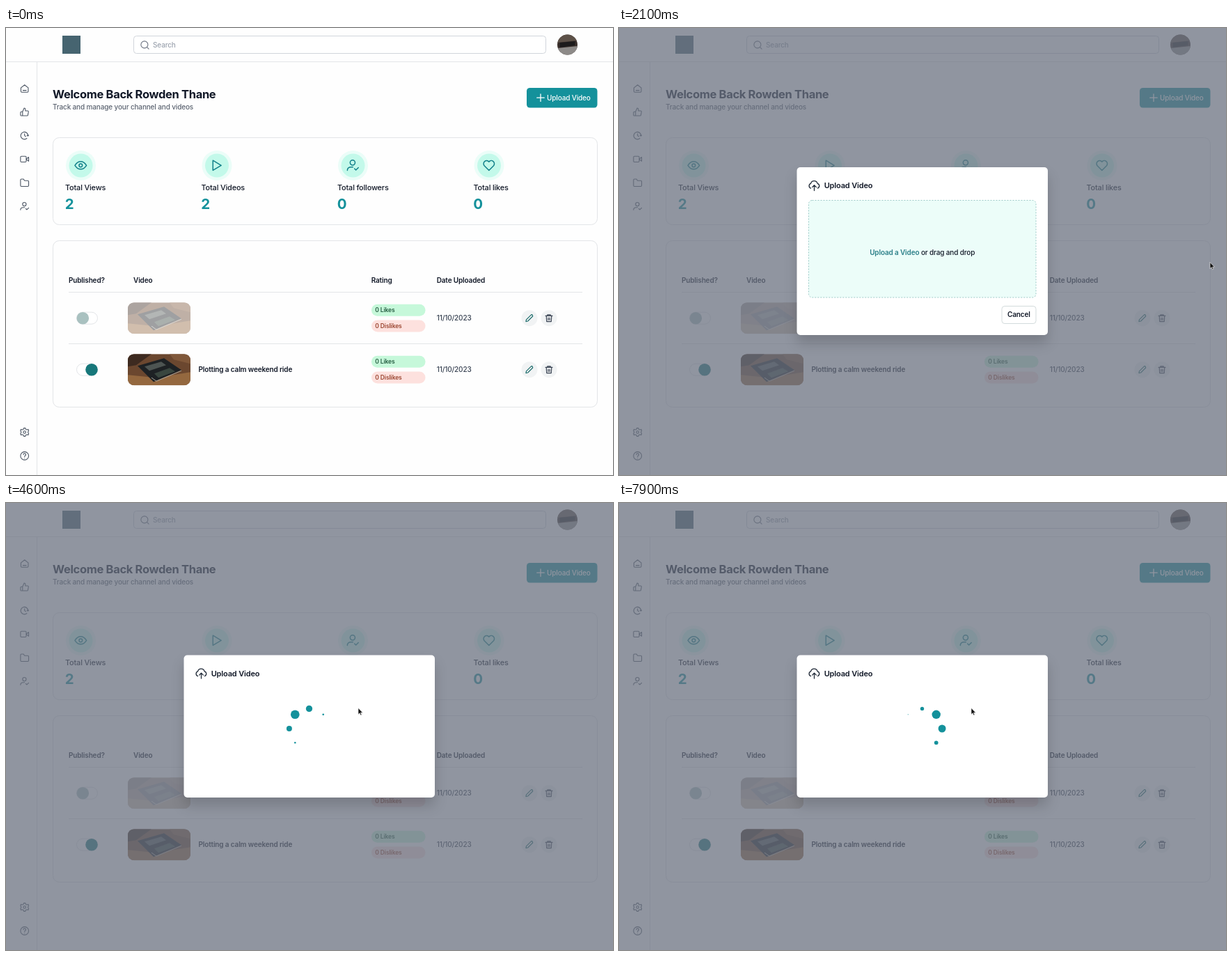
An HTML page that plays this animation: 872x642 px, repeating every 8 s.

```html
<!DOCTYPE html>
<html lang="en">
<head>
<meta charset="utf-8">
<title>Channel dashboard</title>
<style>
  html, body { margin: 0; width: 100%; height: 100%; overflow: hidden; background: #fefefe; }
  svg { display: block; width: 100vw; height: 100vh; }
  text { font: 500 10px Inter, "Liberation Sans", sans-serif; letter-spacing: -.015em; fill: #111827; white-space: pre; }
  .h1 { font-size: 16.5px; font-weight: 700; letter-spacing: -.02em; }
  .sub { fill: #5b6370; }
  .label { font-size: 10.9px; }
  .count { font-size: 20.5px; font-weight: 700; fill: #14919b; }
  .strong { font-weight: 600; }
  .title { font-size: 11px; font-weight: 600; }
  .badge { font-size: 8.5px; font-weight: 600; }
  .line { fill: none; stroke: #e3e5e8; }
  .icon { fill: none; stroke-linecap: round; stroke-linejoin: round; }
  #panelBox { filter: drop-shadow(0 12px 9px rgba(0, 0, 0, .16)); }
</style>
</head>
<body>
<svg viewBox="0 0 872 642" preserveAspectRatio="none">
  <defs>
    <clipPath id="thumbClip"><rect width="90" height="45" rx="9"/></clipPath>
    <clipPath id="avatarClip"><circle r="14.5"/></clipPath>
    <g id="thumb" clip-path="url(#thumbClip)">
      <rect width="90" height="45" fill="#6b472f"/>
      <path d="M0 0h34L12 16 0 18z" fill="#3d2a20"/>
      <path d="M0 30l40 4 50-8v19H0z" fill="#94683f"/>
      <path d="M60 0h30v14L66 8z" fill="#80583a"/>
      <path d="M14 17L52 6l25 17-40 17z" fill="#1d2124"/>
      <path d="M24 18l24-7 7 5-24 8z" fill="#4d5452"/>
      <path d="M38 28l22-8 8 5-24 9z" fill="#39463f"/>
      <path d="M34 34l7 5 36-15" fill="none" stroke="#a9a59b"/>
    </g>
  </defs>
  <g id="page"></g>
  <rect id="overlay" width="872" height="642" fill="#6b7280"/>
  <g id="modal">
    <rect id="panelBox" x="255.5" width="360.5" rx="5" fill="#fff"/>
    <g id="modalHead"></g>
    <g id="dropForm">
      <rect id="zone" x="272.5" y="247.5" width="326.5" height="139.5" rx="5" stroke-dasharray="2 2"/>
      <text x="435.7" y="326.3" text-anchor="middle" fill="#374151"><tspan class="strong" fill="#2b7f88">Upload a Video</tspan> or drag and drop</text>
      <rect x="550" y="399.5" width="49" height="25" rx="4" fill="#fff" stroke="#d3dbdc"/>
      <text class="strong" x="574.3" y="415.3" text-anchor="middle">Cancel</text>
    </g>
    <g id="spinner" fill="#14919b"></g>
  </g>
  <g id="cursor">
    <path id="arrow" d="M0 0v9.2l2.1-2 1.4 3.2 1.5-.7-1.4-3h2.9z" fill="#111" stroke="#fff" stroke-width=".6"/>
    <path id="hand" d="M-.8 .8q.8-1.2 1.6 0v3.4l3.8 .8q1.2 .4 1 1.8l-.6 3.4h-4.6l-2.6-3.6q-.2-1.2 1.4-.2z" fill="#fff" stroke="#222" stroke-width=".8" stroke-linejoin="round"/>
  </g>
</svg>
<script>
const LOOP = 8000, FRAME = 100;
const FADE_START = 465, FADE_MS = 300, DRAG_OVER = 2100, DROP = 2425;
const TEAL = '#14919b';
const $ = id => document.getElementById(id);

// Icons on a 24-unit grid
const ICONS = {
  home: 'M3 10l9-7 9 7v9a2 2 0 0 1-2 2H5a2 2 0 0 1-2-2zM8 16.5h8',
  thumb: 'M7 21V11l4-9a3 3 0 0 1 3 3v4h5.500a2 2 0 0 1 2 2.300l-1.400 8a2 2 0 0 1-2 1.700zM7 21H4a2 2 0 0 1-2-2v-6a2 2 0 0 1 2-2h3',
  history: 'M22 11l-2 2-2-2M20.500 12a9 9 0 1 0-3 6.700M12 7v5l3 2',
  video: 'M4 5h10a2 2 0 0 1 2 2v10a2 2 0 0 1-2 2H4a2 2 0 0 1-2-2V7a2 2 0 0 1 2-2zM16 12l6-5v10z',
  folder: 'M2 5a2 2 0 0 1 2-2h5l3 4h8a2 2 0 0 1 2 2v10a2 2 0 0 1-2 2H4a2 2 0 0 1-2-2z',
  user: 'M7 7a4.500 4.500 0 1 0 9 0a4.500 4.500 0 1 0-9 0M2 21c0-4 3-6 7-6h3M15 18l2.500 2.500L22 16',
  gear: 'M9 12a3 3 0 1 0 6 0a3 3 0 1 0-6 0M10 2h4l1 3 3 1 3-1 1 4-2 3 2 3-1 4-3-1-3 1-1 3h-4l-1-3-3-1-3 1-1-4 2-3-2-3 1-4 3 1 3-1z',
  help: 'M2 12a10 10 0 1 0 20 0a10 10 0 1 0-20 0M9 9a3 3 0 1 1 4.500 2.600Q12 12.500 12 14M12 17.500v.1',
  search: 'M3 11a8 8 0 1 0 16 0a8 8 0 1 0-16 0M17 17l4 4',
  eye: 'M1.500 12Q6 5 12 5t10.500 7Q18 19 12 19T1.500 12zM9 12a3 3 0 1 0 6 0a3 3 0 1 0-6 0',
  play: 'M5 3l15 9-15 9z',
  heart: 'M12 21L3.500 12.500a5.300 5.300 0 0 1 8.500-7a5.300 5.300 0 0 1 8.500 7z',
  plus: 'M12 3v18M3 12h18',
  pencil: 'M3 21l1-5L17 3q2-1 3 1t1 3L8 20z',
  trash: 'M3 6h18M8 6V3h8v3M5 6l1 15h12l1-15M10 11v6M14 11v6',
  cloud: 'M5 17a5 5 0 0 1 0-9.500a7 7 0 0 1 13.500 0a5 5 0 0 1 .5 9.500M8 15l4-4 4 4M12 11v11'
};

const icon = (name, cx, cy, size, color = '#4b5563', width = 1.1) => {
  const k = size / 24;
  return `<path class="icon" d="${ICONS[name]}" stroke="${color}" stroke-width="${width / k}"
    transform="translate(${cx - size / 2} ${cy - size / 2}) scale(${k})"/>`;
};
const text = (x, y, str, cls = '', fill = '') =>
  `<text x="${x}" y="${y}" class="${cls}"${fill && ` style="fill:${fill}"`}>${str}</text>`;
const rect = (x, y, w, h, r, attrs) =>
  `<rect x="${x}" y="${y}" width="${w}" height="${h}" rx="${r}" ${attrs}/>`;
const circle = (x, y, r, fill) => `<circle cx="${x}" cy="${y}" r="${r}" fill="${fill}"/>`;

const header = () => `
  <path class="line" d="M0 48.500h872M44.500 48.500V642"/>
  ${rect(81, 11, 26, 26, 0, 'fill="#466470"')}
  ${rect(183.5, 11.5, 592, 25, 4, 'fill="#fff" stroke="#d1d5db"')}
  ${icon('search', 199.5, 24.5, 15, '#6b7280')}
  ${text(211, 27.6, 'Search', '', '#9ca3af')}
  <g transform="translate(806.500 24)" clip-path="url(#avatarClip)">
    <rect x="-15" y="-15" width="30" height="30" fill="#3a2f2b"/>
    <path d="M-15-15h30v9l-30 3z" fill="#5d5148"/>
    <path d="M-15 5l30-3v13h-30z" fill="#8d8a88"/>
    <path d="M-11-3l22-2v6l-22 3z" fill="#1c1a1b"/>
  </g>`;

const sidebar = () => ['home', 'thumb', 'history', 'video', 'folder', 'user']
  .map((name, i) => icon(name, 26.7, 87 + i * 33.8, 14)).join('') +
  icon('gear', 26.7, 580.5, 14) + icon('help', 26.7, 614.5, 14);

const welcome = () => `
  ${text(67, 101.3, 'Welcome Back Rowden Thane', 'h1')}
  ${text(67, 117, 'Track and manage your channel and videos', 'sub')}
  ${rect(748, 86, 101.5, 28.5, 4.5, `fill="${TEAL}"`)}
  ${icon('plus', 768, 100.2, 14, '#fff', 1.3)}
  ${text(777, 103.8, 'Upload Video', '', '#fff')}`;

const stats = () => rect(67.5, 157.5, 782, 125, 9, 'class="line"') + [
  ['eye', 'Total Views', 2], ['play', 'Total Videos', 2],
  ['user', 'Total followers', 0], ['heart', 'Total likes', 0]
].map(([name, label, count], i) => {
  const x = 85 + i * 195.5;
  return circle(x + 22.5, 197.5, 21.5, '#ebfdf8') + circle(x + 22.5, 197.5, 17, '#c3f9ea') +
    icon(name, x + 22.3, 197.3, 19, '#11808a', 1.5) +
    text(x, 232.7, label, 'label') + text(x - .3, 260.2, count, 'count');
}).join('');

const row = (y, published, title) => `
  ${rect(101.5, y - 8.5, 30, 17, 8.5, 'fill="#fff" stroke="#e3e5e8"')}
  ${circle(published ? 123 : 110.3, y, 8.8, published ? '#17777a' : '#a9c1c0')}
  <use href="#thumb" x="175" y="${y - 22.5}" opacity="${published ? 1 : .42}"/>
  ${text(276.5, y + 3.4, title, 'strong')}
  ${rect(525, y - 20, 77.5, 17, 8.5, 'fill="#c6f8da"')}
  ${rect(525, y + 2.7, 77.5, 17, 8.5, 'fill="#fde1de"')}
  ${text(530.3, y - 8.3, '0 Likes', 'badge', '#245c41')}
  ${text(530.3, y + 14.4, '0 Dislikes', 'badge', '#9a4530')}
  ${text(618.7, y + 3.5, '11/10/2023', '', '#374151')}
  ${circle(752, y, 11.5, '#f1f3f4')}${circle(780, y, 11.5, '#f1f3f4')}
  ${icon('pencil', 751.8, y, 13, '#22706f', 1.2)}
  ${icon('trash', 780, y, 13, '#374151', 1.2)}`;

const table = () => `
  ${rect(67.5, 305.5, 782, 239, 9, 'class="line"')}
  <path class="line" d="M90 379.500h738M90 453.500h738"/>
  ${[[90, 'Published?'], [183, 'Video'], [524.7, 'Rating'], [618.7, 'Date Uploaded']]
    .map(([x, label]) => text(x, 365.8, label, 'strong')).join('')}
  ${row(416.7, false, '')}${row(490.7, true, 'Plotting a calm weekend ride')}`;

$('page').innerHTML = header() + sidebar() + welcome() + stats() + table();
$('modalHead').innerHTML = icon('cloud', 280.5, 26.5, 17, '#1f2937', 1.3) + text(294.7, 30, 'Upload Video', 'title');
$('spinner').innerHTML = Array.from({ length: 8 }, (_, i) => {
  const a = i * Math.PI / 4;
  return `<circle cx="${435.5 + 28.6 * Math.sin(a)}" cy="${324 - 28.6 * Math.cos(a)}"/>`;
}).join('');
const dots = [...$('spinner').children];

const bezier = (x1, y1, x2, y2) => x => {
  const at = (t, a, b) => 3 * (1 - t) * (1 - t) * t * a + 3 * (1 - t) * t * t * b + t * t * t;
  let lo = 0, hi = 1;
  for (let i = 0; i < 24; i++) {
    const mid = (lo + hi) / 2;
    if (at(mid, x1, x2) < x) lo = mid; else hi = mid;
  }
  return at(lo, y1, y2);
};
const fadeEase = bezier(0, 0, .2, 1);
const dotEase = bezier(.2, .2, .4, .8);
const clamp = v => Math.min(1, Math.max(0, v));

// Each dot grows for a third of its second, shrinks for a third, then rests.
const dotRadius = age => {
  if (age < 0) return 0;
  const p = (age % 1) * 3;
  return 6.6 * (p < 1 ? dotEase(p) : p < 2 ? 1 - dotEase(p - 1) : 0);
};

// time, x, y of the pointer tip
const POINTER = [
  [100, 836, 128], [300, 787, 97.5], [600, 787, 97.5],
  [800, 816, 205], [1000, 849, 336.5], [2400, 849, 336.5], [2500, 506, 294.5]
];
const pointerAt = t => {
  const i = POINTER.findIndex(p => p[0] > t);
  if (i < 0) return POINTER[POINTER.length - 1].slice(1);
  if (i === 0) return null;
  const [t0, x0, y0] = POINTER[i - 1], [t1, x1, y1] = POINTER[i];
  const k = (t - t0) / (t1 - t0);
  return [x0 + (x1 - x0) * k, y0 + (y1 - y0) * k];
};
const show = (id, on) => $(id).setAttribute('display', on ? 'inline' : 'none');

function render(t) {
  const p = fadeEase(clamp((t - FADE_START) / FADE_MS));
  const uploading = t >= DROP, over = t >= DRAG_OVER;
  const top = uploading ? 218.5 : 200;

  $('overlay').setAttribute('opacity', .75 * p);
  show('modal', p > 0);
  $('modal').setAttribute('opacity', p);
  $('modal').setAttribute('transform', `translate(435.7 320.7) scale(${.95 + .05 * p}) translate(-435.7 -320.7)`);
  $('panelBox').setAttribute('y', top);
  $('panelBox').setAttribute('height', uploading ? 204.5 : 241);
  $('modalHead').setAttribute('transform', `translate(0 ${top})`);
  $('zone').setAttribute('fill', over ? '#ecfdf9' : '#fff');
  $('zone').setAttribute('stroke', over ? '#9bc9c6' : '#d1d5db');
  show('dropForm', !uploading);
  show('spinner', uploading);
  dots.forEach((dot, i) => dot.setAttribute('r', dotRadius((t - DROP) / 1000 - i / 8)));

  const tip = pointerAt(t), onButton = t >= 200 && t <= 600;
  show('cursor', tip);
  if (tip) $('cursor').setAttribute('transform', `translate(${tip})`);
  show('hand', onButton);
  show('arrow', !onButton);
}

const start = performance.now();
function tick() {
  const t = (performance.now() - start) % LOOP;
  render(Math.floor(t / FRAME) * FRAME);
  requestAnimationFrame(tick);
}
tick();
</script>
</body>
</html>
```
